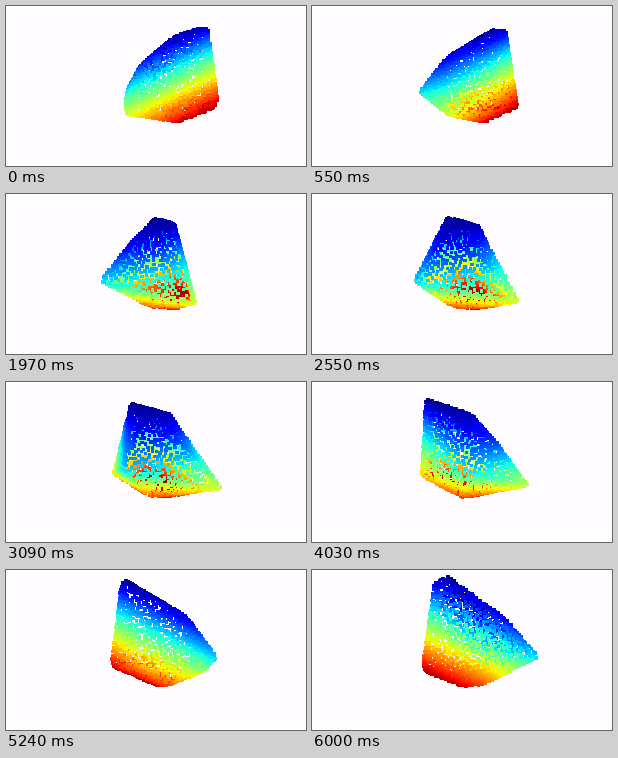
A matplotlib script that plays this animation: 300 by 160 pixels, repeating every 6.03 s.

```python
from itertools import combinations

import matplotlib.pyplot as plt
import numpy as np
from matplotlib.animation import FuncAnimation

W, H, DPI = 300, 160, 100
FRAMES, STEP_MS = 201, 30
CENTER = 161, 80
CAMERA = 300
SPACING, DOT = 3.0, 3.5

# Corners of the solid: bearing (deg), radius, height
CORNERS = [
    (20, 46, 60), (42, 48, 64), (330, 10, 50),      # peak
    (15, 55, -15), (350, 46, -22), (75, 54, -12),   # rim
    (135, 66, -6), (230, 56, -24),
    (190, 28, 18), (125, 36, 30),                   # slope
    (340, 12, -36), (100, 20, -33),                 # base
]


def hull_faces(pts):
    """Outer triangles of a small point set."""
    faces = []
    for tri in combinations(pts, 3):
        a, b, c = tri
        side = (pts - a) @ np.cross(b - a, c - a)
        if np.all(side < 1e-6) or np.all(side > -1e-6):
            faces.append(tri)
    return np.array(faces)


def sample_surface(faces, rng, tries=9000):
    """Evenly spread random points over the triangles."""
    a, b, c = faces.transpose(1, 0, 2)
    area = np.linalg.norm(np.cross(b - a, c - a), axis=1)
    pick = rng.choice(len(faces), tries, p=area / area.sum())
    bary = rng.dirichlet((1, 1, 1), tries)
    spots = np.einsum("nk,nkd->nd", bary, faces[pick])
    kept = spots[:1]
    for p in spots[1:]:
        if np.min(np.sum((kept - p) ** 2, axis=1)) > SPACING ** 2:
            kept = np.vstack([kept, p])
    return kept


bearing, radius, height = np.array(CORNERS, float).T
bearing = np.radians(bearing)
corners = np.column_stack([radius * np.cos(bearing),
                           radius * np.sin(bearing), height])
cloud = sample_surface(hull_faces(corners), np.random.default_rng(4))

# Colour runs straight through space, from the peak to the opposite rim
value = .51 + cloud @ (.005, -.0003, -.0104)
colors = plt.get_cmap("jet")(np.clip(value, .02, .98))

fig = plt.figure(figsize=(W / DPI, H / DPI), dpi=DPI, facecolor="#fefcff")
ax = fig.add_axes([0, 0, 1, 1])
ax.set_xlim(0, W)
ax.set_ylim(H, 0)
ax.axis("off")
dots = ax.scatter(cloud[:, 0], cloud[:, 2], s=(DOT * 72 / DPI) ** 2,
                  marker="s", linewidths=0)


def update(i):
    angle = np.radians(i)
    cos, sin = np.cos(angle), np.sin(angle)
    x = cloud[:, 0] * cos - cloud[:, 1] * sin
    depth = cloud[:, 0] * sin + cloud[:, 1] * cos
    scale = CAMERA / (CAMERA + depth)
    order = np.argsort(-depth)
    xy = np.column_stack([CENTER[0] + x * scale,
                          CENTER[1] - cloud[:, 2] * scale])
    dots.set_offsets(xy[order])
    dots.set_facecolors(colors[order])
    return dots,


anim = FuncAnimation(fig, update, frames=FRAMES, interval=STEP_MS,
                     repeat=True, repeat_delay=0, blit=False)
plt.show()
```
